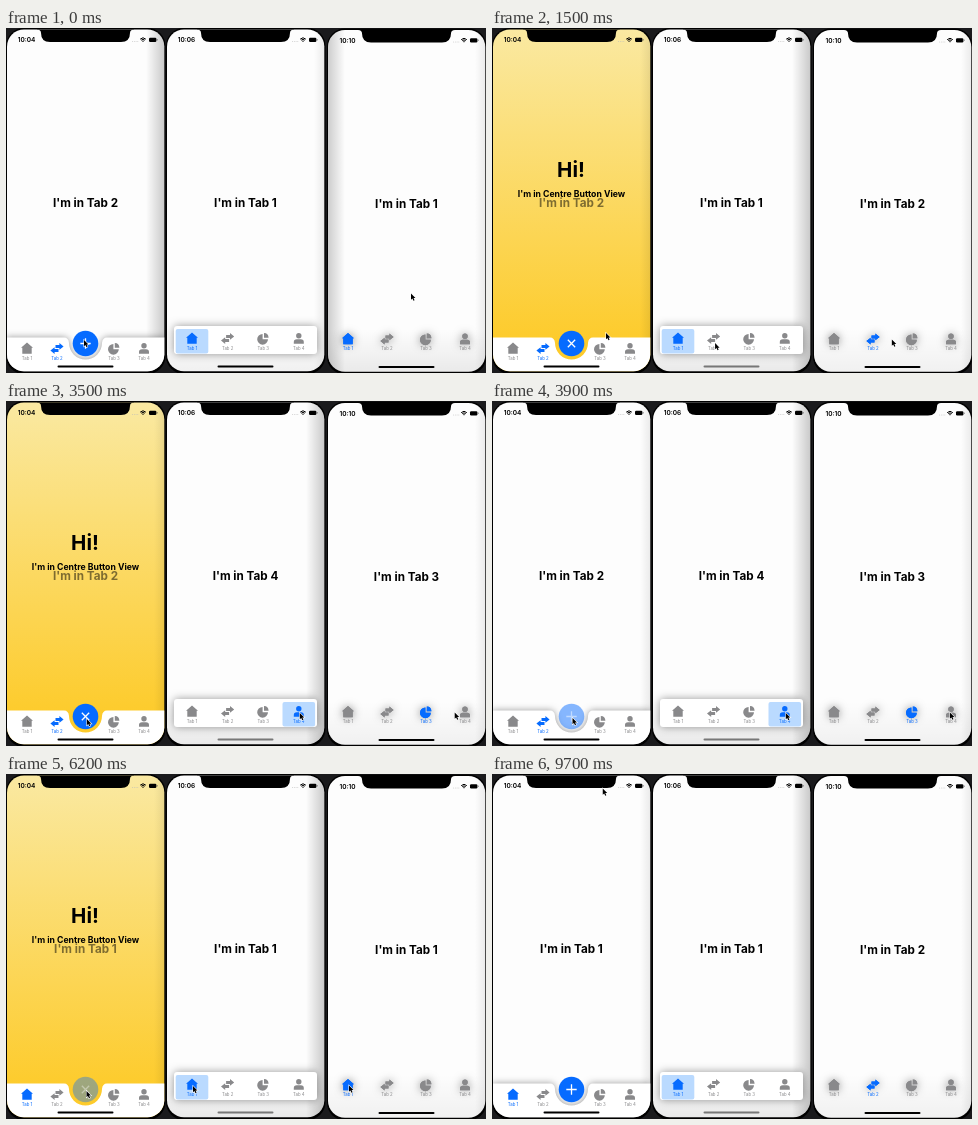
Animation, 480 px wide and 345 px high, one loop 9.8 s. Source, as an HTML page with a canvas:

```html
<!DOCTYPE html>
<html>
<head>
<meta charset="utf-8">
<style>
html, body { margin: 0; width: 100%; height: 100%; overflow: hidden; background: #1a1a1c; }
canvas { display: block; }
</style>
</head>
<body>
<canvas id="stage" width="480" height="345"></canvas>
<script>
const ctx = document.getElementById('stage').getContext('2d');
const LOOP = 9800, STEP = 100, GLIDE = 1900;
const BLUE = '#066bff', GREY = '#89898b';
const CENTRE = 0, CENTRE_X = 79.5;

const ICONS = [
  'M0-6 6-.8H4.7V5.2H-4.7V-.8H-6Z',
  'M-1.5-3.6H2.4V-5.6L6.6-2 2.4 1.2V-.6H-1.5ZM1.5 3.6H-2.4V5.6L-6.6 2-2.4-1.2V.6H1.5Z',
  'M-.6-4.6A5.4 5.4 0 1 0 4.8 .8H-.6ZM.8-5.4A4.8 4.8 0 0 1 5.4-.8H.8Z',
  'M-2.7-2.8A2.7 2.7 0 0 1 2.7-2.8A2.7 2.7 0 0 1-2.7-2.8ZM-5 5.2V3.6Q-5 .8-2 .8H2Q5 .8 5 3.6V5.2Z'
].map(d => new Path2D(d));
const ARROW = new Path2D('M0 0V7.4L1.7 5.9 2.9 8.6 4.2 8 3 5.4H5.3Z');
const NOTCH = new Path2D('M31 0V1.5Q35 1.5 35 5Q35 14 44 14H115Q124 14 124 5Q124 1.5 128 1.5V0Z');
const NOTCHED_BAR = new Path2D('M0 309.5H58Q62.5 309.5 63 315A16.5 16.5 0 0 0 96 315Q96.5 309.5 101 309.5H160V346H0Z');

// An event is a tap [time, tab] or a cursor waypoint [time, x, y] within the phone.
const phones = [
  { x: 0, y: 0, clock: '10:04', first: 21, pitch: 30, gap: 27, iconY: 320.5, tapY: 317, initial: 2,
    events: [[0, 78, 312], [500, CENTRE], [1500, 114, 305], [2600, 86, 334], [3800, CENTRE], [5800, 1],
      [6130, CENTRE], [7000, CENTRE], [7970, CENTRE], [8700, CENTRE], [LOOP, 111, 12]] },
  { x: 160, y: 0, clock: '10:06', first: 26, pitch: 35.6, gap: 0, iconY: 310.5, tapY: 312, initial: 1,
    events: [[800, 68, 346], [1800, 2], [3100, 4], [6100, 1], [8100, 45, 348]] },
  { x: 321, y: .5, clock: '10:10', first: 21, pitch: 39, gap: 0, iconY: 310.5, tapY: 311, initial: 1,
    events: [[0, 84, 265], [1000, 2], [2900, 3], [4200, 4], [5800, 1], [8400, 2], [9600, 94, 330]] }
];

const isTap = event => event.length === 2;

function tabX({ first, pitch, gap }, tab) {
  return tab === CENTRE ? CENTRE_X : first + pitch * (tab - 1) + (tab > 2 ? gap : 0);
}

function stateAt({ events, initial }, t) {
  const taps = events.filter(event => isTap(event) && event[0] <= t);
  const tabTaps = taps.filter(tap => tap[1] !== CENTRE);
  const presses = taps.filter(tap => tap[1] === CENTRE);
  return {
    selected: tabTaps.length ? tabTaps.pop()[1] : initial,
    open: presses.length % 2 === 1,
    pressAge: presses.length ? t - presses.pop()[0] : Infinity
  };
}

function cursorAt(phone, t) {
  const next = phone.events.findIndex(event => event[0] > t);
  if (next < 1) return null;
  const place = event => isTap(event) ? [tabX(phone, event[1]) + 1, phone.tapY] : event.slice(1);
  const from = phone.events[next - 1], to = phone.events[next];
  const start = Math.max(from[0], to[0] - GLIDE);
  const left = 1 - Math.max(0, t - start) / (to[0] - start);
  const [x0, y0] = place(from), [x1, y1] = place(to);
  return [x1 + (x0 - x1) * left ** 2, y1 + (y0 - y1) * left ** 2];
}

function text(str, x, y, size, color, weight = 700) {
  ctx.font = `${weight} ${size}px Inter, sans-serif`;
  ctx.textAlign = 'center';
  ctx.fillStyle = color;
  ctx.fillText(str, x, y);
}

function box(x, y, w, h, r, color) {
  ctx.beginPath();
  ctx.roundRect(x, y, w, h, r);
  ctx.fillStyle = color;
  ctx.fill();
}

function gradient(x0, y0, x1, y1, from, to) {
  const g = ctx.createLinearGradient(x0, y0, x1, y1);
  g.addColorStop(0, from);
  g.addColorStop(1, to);
  return g;
}

// Darkens towards the second point.
function shade(x0, y0, x1, y1, alpha) {
  ctx.fillStyle = gradient(x0, y0, x1, y1, 'rgba(0,0,0,0)', `rgba(0,0,0,${alpha})`);
  ctx.fillRect(0, 0, 160, 346);
}

function withShadow(blur, alpha, draw) {
  ctx.save();
  ctx.shadowColor = `rgba(0,0,0,${alpha})`;
  ctx.shadowBlur = blur;
  draw();
  ctx.restore();
}

function statusBar(clock) {
  text(clock, 20.5, 14, 6.5, '#000', 600);
  for (let i = 0; i < 4; i++) box(126 + i * 1.8, 13, .9, .9, .4, '#bbb');
  ctx.strokeStyle = '#000';
  ctx.lineWidth = 1;
  for (const r of [1, 2.5, 4]) {
    ctx.beginPath();
    ctx.arc(137, 14, r, -Math.PI * .75, -Math.PI * .25);
    ctx.stroke();
  }
  box(143, 9.7, 7.4, 4.2, 1.2, '#000');
  box(150.8, 11, .7, 1.6, .3, '#555');
}

function tabItems(phone, selected, shadow) {
  ICONS.forEach((icon, i) => {
    const x = tabX(phone, i + 1), color = i + 1 === selected ? BLUE : GREY;
    ctx.save();
    ctx.translate(x, phone.iconY);
    ctx.fillStyle = color;
    if (shadow) withShadow(8, .45, () => ctx.fill(icon));
    ctx.fill(icon);
    ctx.restore();
    text('Tab ' + (i + 1), x, phone.iconY + 11.3, 4.3, color, 400);
  });
}

function centreButton(open, alpha) {
  ctx.save();
  ctx.globalAlpha = alpha;
  ctx.translate(CENTRE_X, 315.5);
  ctx.beginPath();
  ctx.arc(0, 0, 12.8, 0, 7);
  ctx.fillStyle = BLUE;
  ctx.fill();
  if (open) ctx.rotate(Math.PI / 4);
  ctx.beginPath();
  ctx.moveTo(-5.2, 0);
  ctx.lineTo(5.2, 0);
  ctx.moveTo(0, -5.2);
  ctx.lineTo(0, 5.2);
  ctx.strokeStyle = '#fff';
  ctx.lineWidth = 1.3;
  ctx.stroke();
  ctx.restore();
}

// The active window casts a wide shadow on its neighbours.
function windowShadows(index, active) {
  if (active === index - 1) shade(18, 0, 0, 0, .2);
  if (active === index + 1) shade(140, 0, 158, 0, .2);
  else shade(148, 0, 158, 0, .07);
  if (index && active !== index) shade(0, 300, 0, 344, .08);
  else if (index) shade(0, 300, 0, 344, .05);
}

function drawPhone(phone, index, t) {
  const { selected, open, pressAge } = stateAt(phone, t);
  const active = t < 1000 ? 1 : 2;
  ctx.save();
  ctx.translate(phone.x, phone.y);
  box(0, 0, 159.5, 346, 18, '#000');
  ctx.beginPath();
  ctx.roundRect(1, 1.5, 157.3, 341.8, 17);
  ctx.clip();

  ctx.fillStyle = open ? gradient(0, 0, 0, 315, '#fae9a2', '#fdcb2b') : '#fdfdfd';
  ctx.fillRect(0, 0, 160, 346);
  text("I'm in Tab " + selected, CENTRE_X, 179, 11.7, open ? 'rgba(0,0,0,.5)' : '#000');
  if (open) {
    text('Hi!', 79, 149, 20.5, '#000');
    text("I'm in Centre Button View", CENTRE_X, 169, 8.7, '#000');
  }
  statusBar(phone.clock);
  windowShadows(index, active);

  if (index === 0) {
    ctx.fillStyle = '#fff';
    withShadow(open ? 0 : 7, open ? 0 : .4, () => ctx.fill(NOTCHED_BAR));
    centreButton(open, Math.min(1, .15 + pressAge / 300));
  } else if (index === 1) {
    withShadow(9, .4, () => box(8, 298, 143, 28, 3, '#fff'));
    box(tabX(phone, selected) - 16.3, 301, 32.6, 24.5, 2, '#badaff');
  }
  tabItems(phone, selected, index === 2);
  box(51.5, 337.6, 56, 2, 1, index === 1 && active !== 1 ? '#777' : '#000');
  ctx.fillStyle = '#000';
  ctx.fill(NOTCH);
  ctx.restore();
}

function drawCursor(phone, t) {
  const pos = cursorAt(phone, t);
  if (!pos) return;
  ctx.save();
  ctx.translate(phone.x + pos[0], phone.y + pos[1]);
  ctx.scale(.85, .85);
  ctx.strokeStyle = '#fff';
  ctx.lineWidth = 1.2;
  ctx.stroke(ARROW);
  ctx.fillStyle = '#000';
  ctx.fill(ARROW);
  ctx.restore();
}

function frame(now) {
  const t = Math.floor(now % LOOP / STEP) * STEP;
  ctx.fillStyle = '#1a1a1c';
  ctx.fillRect(0, 0, 480, 345);
  phones.forEach((phone, i) => drawPhone(phone, i, t));
  if (t >= 2500 && t < 2900) {
    box(72, 333, 46, 13, 2, '#3d3d3d');
    text('Twigharbor', 95, 341.6, 7, '#ddd', 400);
  }
  phones.forEach(phone => drawCursor(phone, t));
  requestAnimationFrame(frame);
}
requestAnimationFrame(frame);
</script>
</body>
</html>
```
